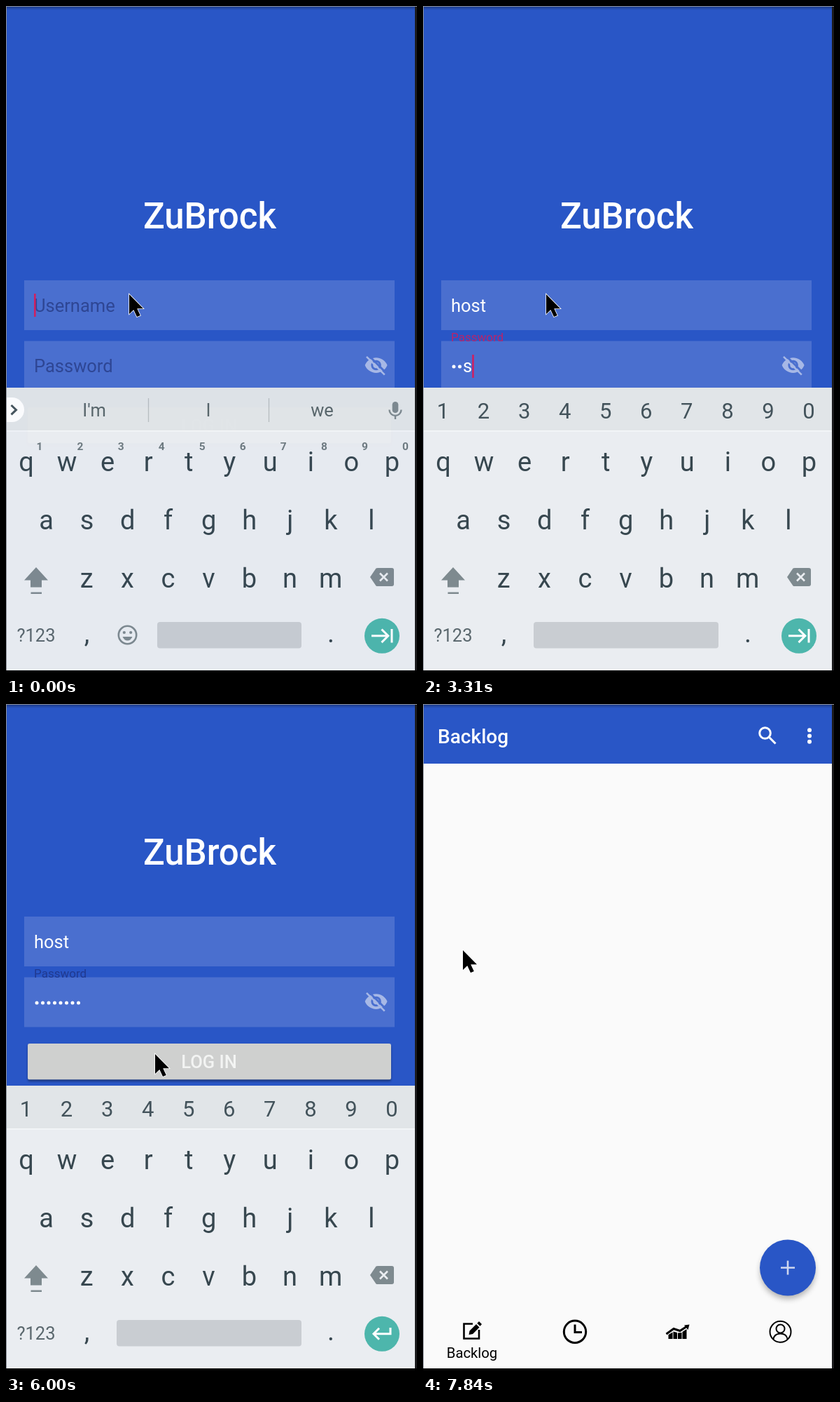
Animation of 587x955 px, one loop 7.99 s. Source, as an HTML page:

```html
<!DOCTYPE html>
<html lang="en">
<head>
<meta charset="utf-8">
<title>Log in</title>
<style>
  html, body { margin: 0; width: 100%; height: 100%; overflow: hidden; background: #000; }
  svg { display: block; }
  text { font-family: Roboto, sans-serif; font-size: 25.5px; }
  .mid { text-anchor: middle; }
  .medium { font-weight: 500; }
  .line { fill: none; stroke-width: 3; }
  #letters text { font-size: 38px; fill: #37474f; }
  #letters .hint { font-size: 15.5px; font-weight: 700; fill: #6f7b80; }
  #digits text { font-size: 31px; fill: #43535b; }
  #words text { fill: #56646a; }
</style>
</head>
<body>
<svg id="stage" width="587" height="955" viewBox="0 0 587 955">
  <defs>
    <linearGradient id="shade" x2="0" y2="1">
      <stop stop-color="#000" stop-opacity=".3"/>
      <stop offset="1" stop-color="#000" stop-opacity="0"/>
    </linearGradient>
    <filter id="soft" x="-30%" y="-30%" width="160%" height="160%"><feGaussianBlur stdDeviation="4"/></filter>
    <filter id="softer" x="-5%" y="-20%" width="110%" height="140%"><feGaussianBlur stdDeviation="1.5"/></filter>
  </defs>

  <rect width="587" height="955" fill="#2956c6"/>

  <g id="form">
    <text class="mid medium" x="291" y="317" fill="#fff" style="font-size:51px">ZuBrock</text>
    <path d="M26 391H555V462H26zM26 477.5H555V548.5H26z" fill="#4a6fcf"/>
    <text id="nameHint" x="40" y="436" fill="#2e4694">Username</text>
    <text id="name" x="40" y="436" fill="#fff"></text>
    <rect id="underline" x="40" y="437.5" height="1.8" fill="#fff"/>
    <text id="label">Password</text>
    <g id="dots" fill="#fff"></g>
    <text id="last" y="522" fill="#fff"></text>
    <rect id="caret" width="2.6" height="33" fill="#cf2062"/>
    <g transform="translate(511.2 494.6) scale(1.45)" fill="#a7b8e6" fill-rule="evenodd">
      <path d="M1 12C2.7 7.6 7 4.5 12 4.5S21.3 7.6 23 12C21.3 16.4 17 19.5 12 19.5S2.7 16.4 1 12zM12 7a5 5 0 0 0 0 10a5 5 0 0 0 0-10z"/>
      <circle cx="12" cy="12" r="3"/>
      <path d="M3.9 1.6L22 19.7" stroke="#4a6fcf" stroke-width="2"/>
      <path d="M2.6 3.6L20.4 21.4" stroke="#a7b8e6" stroke-width="1.8"/>
    </g>
    <rect x="31" y="574" width="519" height="52" rx="3" opacity=".35" filter="url(#softer)"/>
    <svg x="31" y="572" width="519" height="51.5">
      <rect width="519" height="51.5" rx="3" fill="#c9cbca"/>
      <circle id="ripple" cx="182" cy="26" fill="#fff" opacity=".1"/>
    </svg>
    <text class="mid medium" x="290" y="607" fill="#f3f4f3">LOG IN</text>
  </g>

  <g id="keyboard">
    <path d="M0 544H584V947H0z" fill="#eaedf1"/>
    <path d="M0 544H584V605H0z" fill="#e1e5e8"/>
    <path d="M0 605.7H584" stroke="#f6f8f9" stroke-width="1.4"/>
    <g id="letters"></g>
    <g id="digits"></g>
    <g id="words">
      <path d="M203.5 559V593M375.5 559V593" stroke="#b7bdc0" stroke-width="1.3"/>
      <rect x="-20" y="558" width="46" height="35" rx="17.5" fill="#fff"/>
      <path class="line" d="M7.500 569L14.500 575.700L7.500 582.400" stroke="#46555c" stroke-width="2.600"/>
      <text class="mid" x="126" y="585"></text>
      <text class="mid" x="289" y="585"></text>
      <text class="mid" x="451.5" y="585"></text>
      <rect x="551.7" y="564" width="8.6" height="16" rx="4.3" fill="#7e8a8f"/>
      <path d="M547.500 575.500a8.500 8.500 0 0 0 17 0M556 584V589" fill="none" stroke="#7e8a8f" stroke-width="2.4"/>
    </g>
    <g fill="#7e8a8f">
      <path d="M43 800L60 818.500H51V828.500H35V818.500H26zM35.500 835.500H51V838H35.500z"/>
      <path d="M520 814L528.500 801.500Q529.500 801 531 801H551Q554 801 554 804V824Q554 827 551 827H531Q529.500 827 528.500 826.500z"/>
    </g>
    <path class="line" d="M534 808.500L545 819.500M545 808.500L534 819.500" stroke="#eaedf1" style="stroke-width:2.6"/>
    <text class="mid" x="43" y="906" fill="#5a676d">?123</text>
    <g id="smiley">
      <circle class="line" cx="173.5" cy="896.500" r="12.7" stroke="#7e8a8f" style="stroke-width:2.6"/>
      <circle cx="168.800" cy="893" r="2.100" fill="#7e8a8f"/>
      <circle cx="178.200" cy="893" r="2.100" fill="#7e8a8f"/>
      <path d="M166.500 899H180.500Q178 904.500 173.500 904.500T166.500 899z" fill="#7e8a8f"/>
    </g>
    <rect id="space" y="878" height="37.500" rx="4" fill="#c9cdd2"/>
    <circle cx="537" cy="897.800" r="25" fill="#4db6ac"/>
    <path id="action" class="line" stroke="#fff"/>
  </g>

  <g id="home">
    <rect width="587" height="955" fill="#fafafa"/>
    <rect width="587" height="85" fill="#2956c6"/>
    <text class="medium" x="21" y="56" fill="#fff" style="font-size:28px">Backlog</text>
    <g class="line" stroke="#fff">
      <circle cx="488.500" cy="41.500" r="7.800"/>
      <path d="M494 47L503.500 56.500"/>
    </g>
    <g fill="#fff">
      <circle cx="552" cy="37.300" r="3"/><circle cx="552" cy="45.500" r="3"/><circle cx="552" cy="53.800" r="3"/>
    </g>
    <circle cx="521" cy="809" r="39" opacity=".3" filter="url(#soft)"/>
    <circle cx="521" cy="803.500" r="40" fill="#2956c6"/>
    <path class="line" d="M511 803.500H531M521 793.500V813.500" stroke="#cfd7ee" style="stroke-width:2.6"/>
    <text class="mid" x="70" y="932" style="font-size:20.3px">Backlog</text>
    <g class="line" stroke="#000">
      <path d="M71 883.500H58.500V904.500H80V892" style="stroke-width:2.6"/>
      <circle cx="217" cy="894.800" r="15.700"/>
      <path d="M217 884.500V895.500H227"/>
      <g style="stroke-width:2">
        <circle cx="510.500" cy="894.800" r="15"/>
        <circle cx="510.500" cy="890.500" r="6"/>
        <path d="M500.500 905.500Q501.500 897.500 510.500 897.500T520.500 905.500"/>
      </g>
      <path d="M347.500 898L358 890.500L367 893.500L377 887"/>
    </g>
    <path d="M65.500 899L66.500 893.500L76 884L80.500 888.500L71 898zM77.300 882.700L80 880L84 884L81.500 886.800z"/>
    <path d="M373 885.500L380.500 884.500L378.500 892zM350.500 899L356.500 895.500V905H350.500zM357.500 894.500L363 896V905H357.500zM364 896.500L369.500 896V905H364zM370.500 895L376.500 891V905H370.500z"/>
  </g>

  <path id="mouse" d="M0 0V28L6.300 22L11 32L15.800 30L11.200 20.300H20z" stroke="#fff" stroke-width="1.600" paint-order="stroke"/>

  <rect y="1" width="587" height="5" fill="url(#shade)"/>
  <path d="M0 0H587V1H0zM0 0H1V955H0z" fill="#8a8f98"/>
  <path d="M584 1H587V955H584z" fill="#1b1b1d"/>
  <path d="M0 947H587V955H0z"/>
</svg>

<script>
const LOOP = 7990;
const NAME = 'host', SECRET = 'password';
const nameTimes = [1290, 1590, 1790, 1990];
const secretTimes = [2900, 3040, 3310, 3590, 3780, 3960, 4240, 4390];
const suggestions = [
  ["I'm", 'I', 'we'], ['h', 'he', 'her'], ['ho', 'how', 'home'],
  ['hos', 'host', 'hose'], ['host', 'hostname', 'hosts']
];
// time, x, y of the pointer
const route = [
  [5230, 176, 411], [5580, 213, 499], [6480, 213, 499], [6780, 355, 900],
  [7000, 250, 920], [7300, 82, 890], [7450, 80, 864], [7720, 62, 334], [7840, 57, 351]
];
const TAB_ICON = 'M522 897.800H545M536.500 888.500L545.800 897.800L536.500 907.100M551 888V907.500';
const ENTER_ICON = 'M549 889V897.800H525M533 889.800L525 897.800L533 905.800';

const $ = id => document.getElementById(id);
const set = (id, attrs) => { for (const k in attrs) $(id).setAttribute(k, attrs[k]); };
const show = (id, on) => set(id, { visibility: on ? 'visible' : 'hidden' });
const typed = (times, t) => times.filter(at => at <= t).length;
const lerp = (a, b, k) => a + (b - a) * k;
const ramp = (t, from, to) => Math.min(1, Math.max(0, (t - from) / (to - from)));

const row = (chars, x, y, cls = '') => [...chars].map((c, i) =>
  `<text class="mid ${cls}" x="${x + 58.05 * i}" y="${y}">${c}</text>`).join('');

$('letters').innerHTML = row('qwertyuiop', 29, 663) + row('asdfghjkl', 57.500, 745.500) +
  row('zxcvbnm', 115.300, 828.500) + row(',', 115.500, 907) + row('.', 464, 907) +
  `<g id="hints">${row('1234567890', 48, 632.500, 'hint')}</g>`;
$('digits').innerHTML = row('1234567890', 28.500, 588);
$('dots').innerHTML = [...SECRET].map((c, i) =>
  `<circle cx="${44 + 8.500 * i}" cy="514" r="2.500"/>`).join('');
const wordNodes = $('words').querySelectorAll('text');
const dotNodes = $('dots').children;

function pointer(t) {
  const i = route.findIndex(p => p[0] > t);
  if (i === 0) return route[0].slice(1);
  if (i < 0) return route[route.length - 1].slice(1);
  const [a, b] = [route[i - 1], route[i]], k = ramp(t, a[0], b[0]);
  return [lerp(a[1], b[1], k), lerp(a[2], b[2], k)];
}

function draw(t) {
  const inSecret = t >= 2640, done = t >= 4790;

  // name field
  const n = typed(nameTimes, t);
  $('name').textContent = NAME.slice(0, n);
  const nameWidth = n ? $('name').getComputedTextLength() : 0;
  show('nameHint', !n);
  show('underline', n && !inSecret);
  set('underline', { width: nameWidth });

  // password field: only the newest character is readable
  const s = typed(secretTimes, t);
  const hidden = done ? s : Math.max(0, s - 1);
  [...dotNodes].forEach((d, i) => d.setAttribute('visibility', i < hidden ? 'visible' : 'hidden'));
  $('last').textContent = SECRET.slice(hidden, s);
  const lastX = 40 + 8.500 * hidden;
  set('last', { x: lastX });
  const lift = t < 2640 ? 0 : lerp(.5, 1, ramp(t, 2640, 2780));
  set('label', {
    transform: `translate(40 ${lerp(521.500, 478, lift)}) scale(${lerp(1, .667, lift)})`,
    fill: done ? '#20398f' : inSecret ? '#b8246b' : '#2e4694'
  });

  const lastWidth = s && !done ? $('last').getComputedTextLength() : 0;
  show('caret', inSecret ? !done : t < 580 || (t >= 1010 && t < 2490));
  set('caret', inSecret ? { x: lastX + lastWidth, y: 497 } : { x: 40 + nameWidth, y: 410 });

  set('form', { transform: `translate(0 ${t < 4790 ? 0 : t < 4910 ? -50 : -88})` });
  set('ripple', { r: 380 * ramp(t, 5500, 5730) });

  // keyboard
  set('keyboard', { opacity: t < 150 ? .98 : 1 });
  show('words', !inSecret);
  show('hints', !inSecret);
  show('smiley', !inSecret);
  show('digits', inSecret);
  wordNodes.forEach((node, i) => node.textContent = suggestions[n][i]);
  const left = inSecret ? 158 : 216;
  set('space', { x: left, width: 422 - left });
  set('action', { d: done ? ENTER_ICON : TAB_ICON });

  // the next screen rises while it fades in
  show('home', t >= 6120);
  set('home', t < 6240 ? { opacity: .7, transform: 'translate(0 30)' } : { opacity: 1, transform: '' });

  set('mouse', { transform: `translate(${pointer(t)})` });
}

const start = performance.now();
function tick() {
  draw((performance.now() - start) % LOOP);
  requestAnimationFrame(tick);
}
tick();
</script>
</body>
</html>
```
